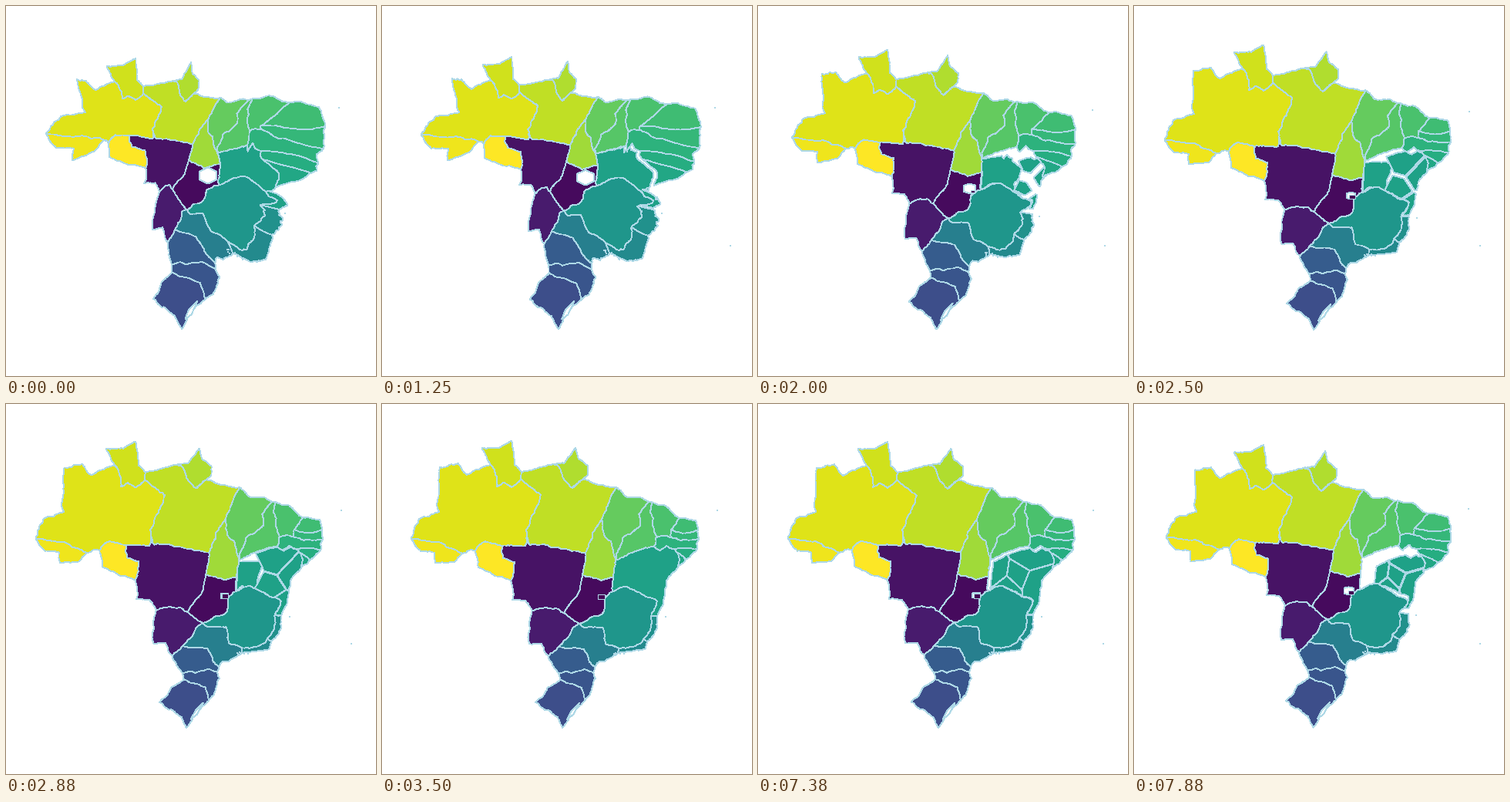
A matplotlib script that plays this animation: 480x480 px, repeating every 8 s.

```python
from itertools import combinations

import numpy as np
import matplotlib.pyplot as plt
from matplotlib.animation import FuncAnimation
from matplotlib.collections import PolyCollection

SIZE, FRAMES, STEPS = 480, 64, 25
EDGE = "#add8e6"
# Official state codes; the colour scale runs backwards over them.
CODES = dict(RO=11, AC=12, AM=13, RR=14, PA=15, AP=16, TO=17, MA=21, PI=22,
             CE=23, RN=24, PB=25, PE=26, AL=27, SE=28, BA=29, MG=31, ES=32,
             RJ=33, SP=35, PR=41, SC=42, RS=43, MS=50, MT=51, GO=52, DF=53)
COLOR = {s: plt.cm.viridis((53 - c) / 42) for s, c in CODES.items()}

rng = np.random.default_rng(7)
joints, shores, pins = {}, [], []


def pin(point):
    """A point is (x, y), or (x, y, u, v) when it also fixes the cartogram warp."""
    if len(point) == 4:
        pins.append(point)
    return np.array(point[:2], float)


def coast(state, *points):
    """Outer edge of a state, clockwise, up to where the next one begins."""
    shores.append((state, [pin(p) for p in points]))


def joint(states, *point):
    joints[states] = pin(point)


coast("RR", (141, 79, 141, 98), (130, 57, 131, 78), (152, 57), (168, 48, 168, 68), (172, 79))
coast("PA", (181, 88, 178, 104), (206, 82))
coast("AP", (222, 78, 217, 97), (236, 77), (251, 57, 240, 73), (255, 71), (267, 80), (267, 92))
coast("PA", (247, 109, 233, 124), (259, 97), (285, 105))
coast("MA", (304, 108, 278, 119), (316, 120), (334, 121))
coast("PI", (346, 127, 315, 122))
coast("CE", (350, 127), (368, 132, 342, 116))
coast("RN", (386, 148, 368, 125), (407, 151, 406, 131))
coast("PB", (410, 163, 414, 156))
coast("PE", (411, 175, 412, 185))
coast("AL", (409, 188, 405, 203))
coast("SE", (394, 202, 395, 217))
coast("BA", (384, 211, 350, 235), (369, 229), (367, 240, 352, 244), (364, 262))
coast("ES", (357, 275, 354, 264), (357, 290), (350, 303))
coast("RJ", (344, 308, 345, 297), (341, 318, 337, 329), (320, 321, 315, 331))
coast("SP", (306, 323, 294, 320), (282, 334))
coast("PR", (276, 341, 271, 333))
coast("SC", (274, 348), (274, 364, 275, 360), (270, 377))
coast("RS", (263, 385, 258, 381), (240, 412), (234, 420, 228, 419), (228, 406), (206, 393),
      (199, 387, 191, 380), (215, 368))
coast("SC", (231, 358, 215, 346))
coast("PR", (229, 349), (224, 343))
coast("MS", (216, 327, 210, 307), (207, 311), (191, 311, 190, 290), (192, 278))
coast("MT", (195, 268, 199, 241), (186, 255), (169, 254, 179, 230))
coast("RO", (167, 229, 181, 210), (142, 220), (125, 212, 134, 196))
coast("AM", (121, 190, 133, 178))
coast("AC", (104, 194, 127, 174), (94, 205), (69, 206, 86, 200), (68, 193), (50, 191))
coast("AM", (38, 175, 52, 166), (43, 158), (48, 149), (74, 140, 103, 138), (74, 105),
      (75, 82, 92, 95), (99, 77, 104, 97), (110, 92), (127, 84))

joint("RR AM PA", 180, 97, 178, 113)
joint("AM PA MT", 188, 170, 191, 164)
joint("AM RO MT", 156, 184, 160, 168)
joint("PA MT TO", 264, 193, 242, 179)
joint("MT TO GO", 260, 222, 237, 200)
joint("PA TO MA", 285, 150, 262, 147)
joint("TO MA PI BA", 303, 203, 274, 190)
joint("TO GO BA", 300, 225, 278, 205)
joint("GO BA MG", 300, 243, 277, 232)
joint("MT MS GO", 236, 271, 216, 238)
joint("MS GO MG SP", 256, 285, 234, 264)
joint("MS SP PR", 229, 315, 219, 290)
joint("PI CE PE", 356, 173, 316, 163)
joint("PI PE BA", 353, 185, 313, 181)
joint("CE RN PB", 375, 163, 331, 155)
joint("CE PB PE", 375, 173, 331, 160)
joint("PE AL BA", 380, 188, 331, 188)
joint("AL SE BA", 383, 193, 333, 199)
joint("BA ES MG", 349, 275, 330, 258)
joint("ES MG RJ", 340, 304, 322, 285)
joint("MG SP RJ", 307, 317, 288, 306)

# Bends of the inland borders that are far from straight.
BENDS = {
    "AM RR": [(146, 85), (149, 107), (157, 102), (168, 108)],
    "AM PA": [(206, 118), (187, 163)],
    "AC AM": [(74, 179)],
    "RO AM": [(134, 178)],
    "RO MT": [(157, 200), (172, 205)],
    "AM MT": [(186, 184)],
    "PA AP": [(231, 84)],
    "PA MT": [(192, 183)],
    "PA TO": [(273, 167)],
    "TO MA": [(288, 170), (297, 178)],
    "TO GO": [(284, 229)],
    "MT GO": [(256, 243)],
    "MS MT": [(213, 264), (230, 267)],
    "MG GO": [(289, 252), (285, 273)],
    "BA MG": [(318, 237, 313, 222), (335, 245, 338, 242), (357, 256)],
    "MG ES": [(350, 285)],
    "MG RJ": [(330, 313)],
    "MG SP": [(262, 290), (286, 290), (291, 312)],
    "SP PR": [(262, 318), (268, 332)],
    "SC RS": [(259, 368)],
    "MA PI": [(333, 143), (335, 158), (312, 174)],
    "PI CE": [(348, 141)],
    "PI BA": [(329, 191)],
    "RN PB": [(388, 167)],
    "PB PE": [(388, 177)],
    "PE BA": [(361, 190), (369, 184)],
}
bends = {frozenset(k.split()): [pin(p) for p in v] for k, v in BENDS.items()}


def spline(r2):
    return r2 * np.log(r2 + 1e-9)


def sqdist(a, b):
    return ((a[:, None] - b[None]) ** 2).sum(-1)


def affine(p):
    return np.c_[np.ones(len(p)), p / SIZE]


PINS = np.array(pins, float)
base = PINS[:, :2]
side = affine(base)
system = np.block([[spline(sqdist(base, base)), side], [side.T, np.zeros((3, 3))]])
weights = np.linalg.solve(system, np.vstack([PINS[:, 2:] - base, np.zeros((3, 2))]))


def warp(p):
    """Thin-plate spline from the true map to the cartogram."""
    p = np.atleast_2d(np.asarray(p, float))
    return p + np.hstack([spline(sqdist(p, base)), affine(p)]) @ weights


def roughen(p, levels=4):
    """Fractal midpoint displacement."""
    p = np.array(p, float)
    for _ in range(levels):
        d = np.diff(p, axis=0)
        bump = np.clip(rng.normal(0, 0.06, len(d)), -1, 1)
        size = np.maximum(np.hypot(*d.T), 1e-6)
        bump *= np.minimum(1, 20 / size)
        out = np.empty((2 * len(p) - 1, 2))
        out[::2] = p
        out[1::2] = p[:-1] + d / 2 + np.c_[-d[:, 1], d[:, 0]] * bump[:, None]
        p = out
    return p


arcs = []
for i, (state, points) in enumerate(shores):
    joints[shores[i - 1][0] + " " + state] = points[0]
    follow = shores[(i + 1) % len(shores)][1][0]
    arcs.append(({state}, roughen(points + [follow])))

for pair in map(set, combinations(CODES, 2)):
    ends = [p for name, p in joints.items() if pair <= set(name.split())]
    if len(ends) == 2:
        mids = bends.get(frozenset(pair), [])
        if mids:
            ends.sort(key=lambda p: np.hypot(*(p - mids[0])) - np.hypot(*(p - mids[-1])))
            if len(mids) == 1:
                ends.sort(key=lambda p: p[0])
        arcs.append((pair, roughen([ends[0], *mids, ends[1]])))


def ring(state):
    """Chain the arcs of a state into one closed outline."""
    todo = [p for owners, p in arcs if state in owners]
    out = [todo.pop(0)]
    while todo:
        end = out[-1][-1]
        _, i, e = min((np.hypot(*(p[e] - end)), i, e) for i, p in enumerate(todo) for e in (0, -1))
        p = todo.pop(i)
        out.append(p if e == 0 else p[::-1])
    return np.vstack(out)


RINGS = {s: ring(s) for s in CODES if s != "DF"}
RINGS = {s: (r, warp(r)) for s, r in RINGS.items()}

# The federal district: a small box that opens to a wide hexagon.
angle = np.radians(np.arange(6) * 60 + 30)
hexagon = np.c_[np.cos(angle), np.sin(angle)]
BOX = np.array([284.5, 250]) + np.clip(hexagon * 2, -1, 1) * [4.5, 3]
HOLE = BOX, np.array([262, 220]) + hexagon * [13, 10.5]
DISTRICT = BOX, np.array([272, 229])

LAGOON = np.array([(256, 388), (248, 403), (240, 409), (246, 398)])
LAGOON = LAGOON, warp(LAGOON)


def cells(outline, seeds):
    """Split an outline into the areas nearest to each seed."""
    seeds, out = np.array(seeds, float), []
    for s in seeds:
        poly = outline
        for t in seeds:
            if (s == t).all():
                continue
            d = (poly - (s + t) / 2) @ (t - s)
            cut = []
            for a, b, da, db in zip(poly, np.roll(poly, -1, 0), d, np.roll(d, -1)):
                if da <= 0:
                    cut.append(a)
                if da * db < 0:
                    cut.append(a + (b - a) * da / (da - db))
            poly = np.array(cut)
        out.append(poly)
    return out


# Bahia breaks up in motion: pieces grow from, or shrink to, a spot on its coast.
HUB = np.array([354, 233])
bahia = RINGS["BA"][0]
GROWING = cells(bahia, [(312, 222), (352, 203), (342, 238), (370, 220), (358, 262)])[1:]
PARTING = cells(bahia, [(308, 218), (335, 222), (350, 197), (322, 236), (360, 232)])
BODY = np.c_[301 + (bahia[:, 0] - 301) * 0.36, np.clip(bahia[:, 1], 205, 242)], RINGS["BA"][1]


def mix(pair, p):
    return pair[1] + (np.asarray(pair[0]) - pair[1]) * p


def gather(pieces, pull, p):
    mids = [c.mean(0) for c in pieces]
    return [mix((c, m + (HUB - m) * pull), p) for c, m in zip(pieces, mids)]


def bahia_parts(p, mode):
    if mode == "hold":
        return [mix(RINGS["BA"], p)]
    if mode == "out":
        return [mix(BODY, p)] + gather(GROWING, 0.5, p)
    return gather(PARTING, 0.9, p)


def ease(t):
    return 4 * t**3 if t < 0.5 else 1 - 4 * (1 - t)**3


def phase(n):
    if n < 4:
        return 0, "hold"
    if n < 28:
        return ease((n - 3) / STEPS), "out"
    if n < 54:
        return 1, "hold"
    return 1 - ease((n - 53) / STEPS), "back"


def dot(pair, p, r=0.5):
    return mix(pair, p) + r * np.array([(-1, -1), (1, -1), (1, 1), (-1, 1)])


islets = np.c_[rng.uniform(297, 316, 9), rng.uniform(321, 325, 9)]
SPECKS = [(np.array(a), np.array(b)) for a, b in
          [((434.5, 137.5), (431.5, 131)), ((367.5, 275.5), (361.5, 268)),
           *zip(islets, warp(islets))]]
FAR_ISLE = np.array([447.5, 311]), np.array([451.5, 310])


def scene(n):
    p, mode = phase(n)
    items = [(v, COLOR["BA"], EDGE) for v in bahia_parts(p, mode)]
    items += [(mix(r, p), COLOR[s], EDGE) for s, r in RINGS.items() if s != "BA"]
    if p < 1:
        items.append((mix(HOLE, p), "white", EDGE))
    if p > 0.5:
        items.append((mix(DISTRICT, p), COLOR["DF"], EDGE))
    items.append((mix(LAGOON, p), "white", EDGE))
    specks = SPECKS + ([FAR_ISLE] if mode != "hold" else [])
    return items + [(dot(s, p), EDGE, "none") for s in specks]


fig = plt.figure(figsize=(4.8, 4.8), dpi=100, facecolor="white")
ax = fig.add_axes([0, 0, 1, 1])
ax.set(xlim=(0, SIZE), ylim=(SIZE, 0))
ax.axis("off")
shapes = PolyCollection([], linewidths=0.6, antialiaseds=False)
ax.add_collection(shapes)


def update(n):
    verts, faces, edges = zip(*scene(n))
    shapes.set_verts(verts)
    shapes.set_facecolor(faces)
    shapes.set_edgecolor(edges)
    return [shapes]


anim = FuncAnimation(fig, update, frames=FRAMES, interval=125, init_func=lambda: update(0),
                     repeat=True, repeat_delay=0)
plt.show()
```
